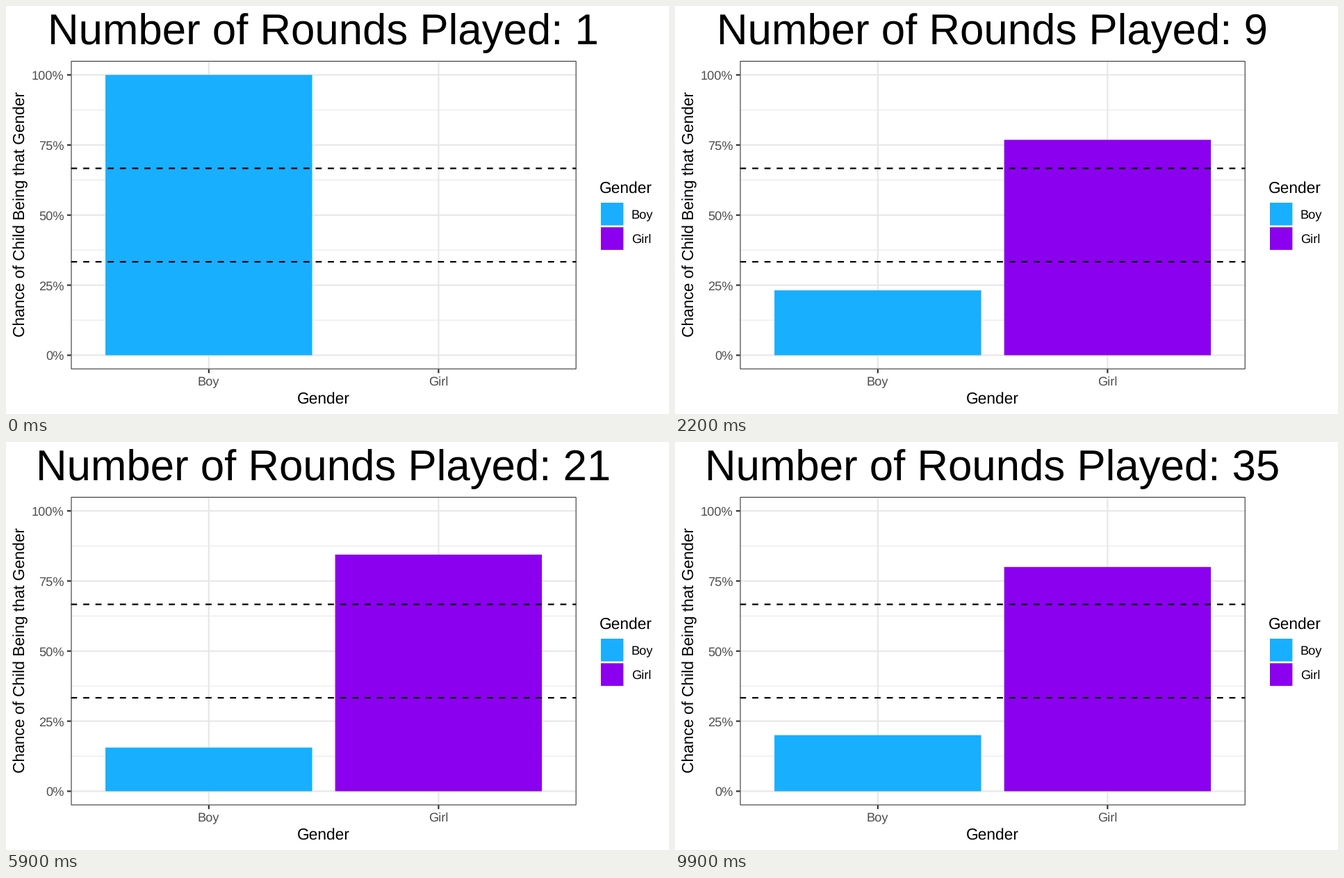
A matplotlib script for the animation above (10000 ms loop, 954x587 px).

```python
import matplotlib.pyplot as plt
import numpy as np
from matplotlib.animation import FuncAnimation
from matplotlib.patches import Rectangle

W, H, DPI = 954, 587, 64
FRAMES, INTERVAL, ROUNDS = 100, 100, 35
PT = 72 / DPI  # points per pixel

BLUE, PURPLE = "#18AFFF", "#8B00EE"
GRID, DARK, TICK_TEXT = "#E8E8E8", "#333333", "#4D4D4D"
LEFT, RIGHT, TOP, BOTTOM = 93.5, 820.7, 79.0, 522.6
LINE = 2.2
SMALL, MEDIUM, LARGE = 18.3, 22.7, 61.8

UNIT_X = (RIGHT - LEFT) / 2.2
UNIT_Y = (BOTTOM - TOP) / 1.1
BOY_X, GIRL_X = LEFT + 0.6 * UNIT_X, LEFT + 1.6 * UNIT_X
BAR_W = 0.9 * UNIT_X

plt.rcParams.update({
    "font.family": "Liberation Sans",
    "text.hinting": "none",
    "path.snap": False,
})

# Share of girls after each round, tweened between rounded key times
rounds = np.arange(1, ROUNDS + 1)
boy_rounds = [1, 6, 10, 22, 28, 31, 33]
girl_share = np.cumsum(~np.isin(rounds, boy_rounds)) / rounds
key_times = np.round((rounds - 1) * (FRAMES - 1) / (ROUNDS - 1))

fig = plt.figure(figsize=(W / DPI, H / DPI), dpi=DPI, facecolor="white")
ax = fig.add_axes([0, 0, 1, 1])
ax.set_xlim(0, W)
ax.set_ylim(H, 0)
ax.axis("off")


def y_at(share):
    return BOTTOM - (share + 0.05) * UNIT_Y


def line(x0, y0, x1, y1, color, width=LINE, z=1, style="-"):
    ax.plot([x0, x1], [y0, y1], color=color, lw=width * PT, zorder=z,
            linestyle=style, solid_capstyle="butt", dash_capstyle="butt")


def rect(x, y, w, h, color, z=3):
    patch = Rectangle((x, y), w, h, facecolor=color, edgecolor="none",
                      linewidth=0, zorder=z)
    return ax.add_patch(patch)


def label(x, y, text, size, color="black", **kw):
    return ax.text(x, y, text, fontsize=size * PT, color=color,
                   ha="left", va="baseline", **kw)


# Grid, ticks and tick labels
for share in (0.125, 0.375, 0.625, 0.875):
    line(LEFT, y_at(share), RIGHT, y_at(share), GRID, LINE / 2)
for pct in range(0, 101, 25):
    y = y_at(pct / 100)
    line(LEFT, y, RIGHT, y, GRID)
    line(LEFT - 5.6, y, LEFT, y, DARK)
    width = SMALL * (0.889 + 0.556 * len(str(pct)))
    label(83.7 - width, y + 6.8, f"{pct}%", SMALL, TICK_TEXT)
for x, left, name in ((BOY_X, 275.8, "Boy"), (GIRL_X, 608, "Girl")):
    line(x, TOP, x, BOTTOM, GRID)
    line(x, BOTTOM, x, BOTTOM + 5.6, DARK)
    label(left, 546, name, SMALL, TICK_TEXT)

# Bars, thresholds and panel border
boy_bar = rect(BOY_X - BAR_W / 2, y_at(0), BAR_W, 0, BLUE)
girl_bar = rect(GIRL_X - BAR_W / 2, y_at(0), BAR_W, 0, PURPLE)
for share in (1 / 3, 2 / 3):
    line(LEFT, y_at(share), RIGHT, y_at(share), "black", z=4,
         style=(0, (4, 4)))
ax.add_patch(Rectangle((LEFT + 0.5, TOP + 0.5), RIGHT - LEFT - 1,
                       BOTTOM - TOP - 1, fill=False, edgecolor=DARK,
                       linewidth=1.1 * PT, zorder=5))

# Axis titles and legend
label(419.2, 572, "Gender", MEDIUM)
label(27.5, 476.5, "Chance of Child Being that Gender", MEDIUM,
      rotation=90, rotation_mode="anchor")
label(854, 269, "Gender", MEDIUM)
for y, color, name in ((283, BLUE, "Boy"), (318.3, PURPLE, "Girl")):
    rect(856, y, 32.4, 32.6, color)
    label(899.8, y + 23, name, SMALL)

title = label(60.3, 55.5, "", LARGE)


def update(frame):
    girl = np.interp(frame, key_times, girl_share)
    for bar, share in ((boy_bar, 1 - girl), (girl_bar, girl)):
        bar.set_y(y_at(share))
        bar.set_height(share * UNIT_Y)
    count = round(1 + frame * (ROUNDS - 1) / (FRAMES - 1))
    title.set_text(f"Number of Rounds Played: {count}")
    title.set_x(60.3 if count < 10 else 43.2)
    return boy_bar, girl_bar, title


anim = FuncAnimation(fig, update, frames=FRAMES, interval=INTERVAL,
                     init_func=lambda: update(0), repeat=True,
                     repeat_delay=0)
plt.show()
```
